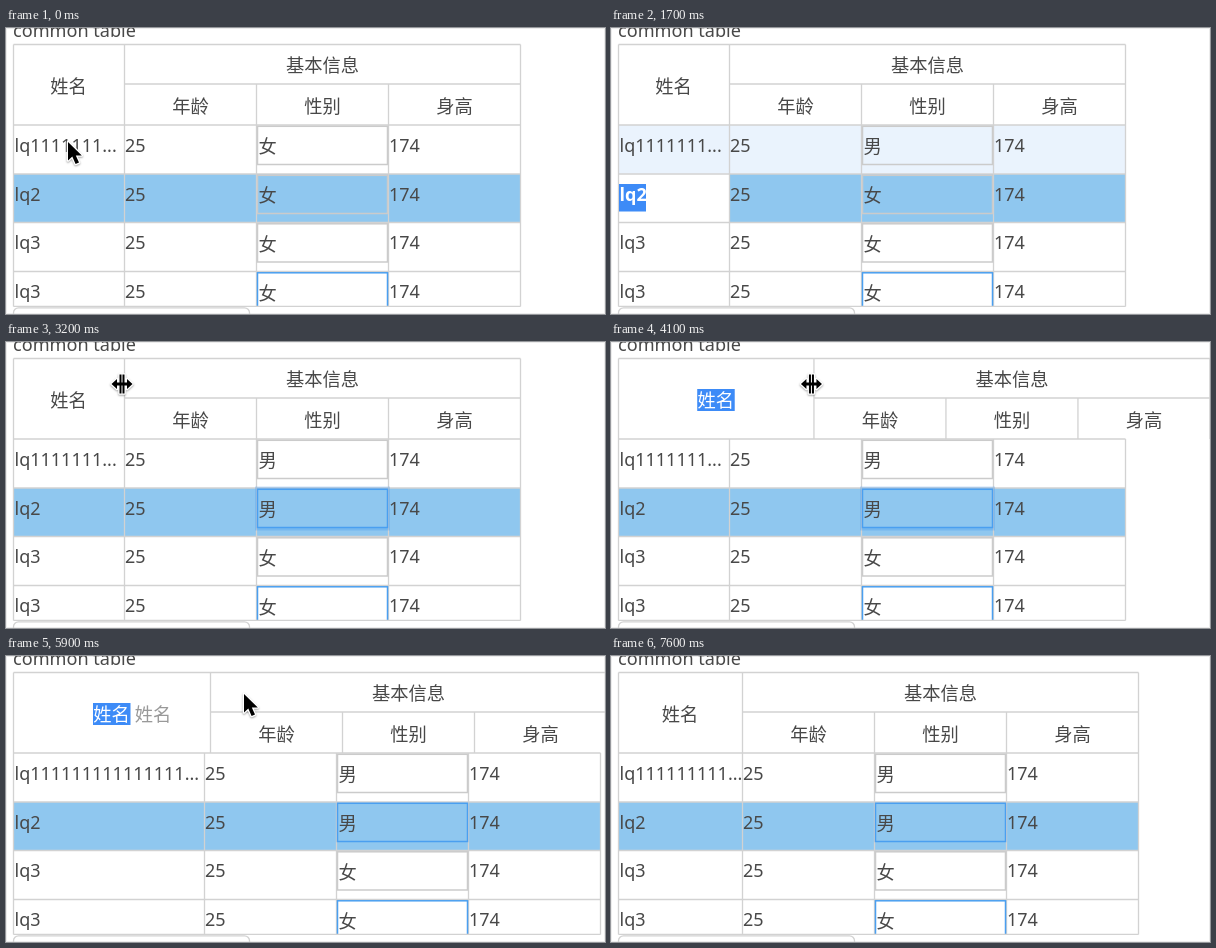
Animation of 599x286 px, one loop 7700 ms. Source, as an HTML page with a canvas:

```html
<!DOCTYPE html>
<html lang="zh-CN">
<head>
<meta charset="utf-8">
<title>common table</title>
<style>
html, body { margin: 0; width: 100%; height: 100%; overflow: hidden; background: #fff; }
canvas { display: block; }
</style>
</head>
<body>
<canvas id="stage" width="599" height="286"></canvas>
<script>
const ctx = document.getElementById('stage').getContext('2d');
const LOOP = 7700, STEP = 100;
const LEFT = 7.5, COL = 132, BOTTOM = 278.5;
const ROWS = [97, 146, 194.5, 243.5];
const INK = '#484848', LINE = '#d2d2d2', BLUE = '#4a9ff0', ROW = '#8fc7ef', HOVER = '#eaf3fd', MARK = '#3d8bf7';
const FACE = '"Noto Sans", "Noto Sans CJK SC", "Noto Sans CJK", sans-serif';

const arrow = new Path2D('M0 0V18.5L4.3 14.6L7.6 22L11 20.5L7.8 13.4H13.8Z');
const resize = new Path2D('M-2.5-9.5H-.5V-1.5H.5V-9.5H2.5V-1.5H5V-5L10.5 0L5 5V1.5H2.5V9.5H.5V1.5H-.5V9.5H-2.5V1.5H-5V5L-10.5 0L-5-5V-1.5H-2.5Z');

// Smooth interpolation through [time, value] points
function track(t, keys) {
  const i = keys.findIndex(k => k[0] > t);
  if (i < 0) return keys[keys.length - 1][1];
  if (i === 0) return keys[0][1];
  const [t0, a] = keys[i - 1], [t1, b] = keys[i];
  const p = (t - t0) / (t1 - t0);
  return a + (b - a) * p * p * (3 - 2 * p);
}
const within = (t, from, to) => t >= from && t < to;

function text(str, x, y, color = INK, align = 'left', size = 18, weight = 400) {
  ctx.font = `${weight} ${size}px ${FACE}`;
  ctx.textAlign = align;
  ctx.fillStyle = color;
  ctx.fillText(str, x, y);
}
function fill(x, y, w, h, color) {
  ctx.fillStyle = color;
  ctx.fillRect(x, y, w, h);
}
function line(x1, y1, x2, y2) {
  ctx.strokeStyle = LINE;
  ctx.lineWidth = 1.3;
  ctx.beginPath();
  ctx.moveTo(x1, y1);
  ctx.lineTo(x2, y2);
  ctx.stroke();
}
function box(x, y, w, h, color, width = 1.5) {
  ctx.strokeStyle = color;
  ctx.lineWidth = width;
  ctx.strokeRect(x, y, w, h);
}

function header(t, width) {
  const x = LEFT + width, right = x + 3 * COL, mid = LEFT + width / 2;
  line(LEFT, 16.5, right, 16.5);
  line(x, 56, right, 56);
  for (const gx of [LEFT, x, right]) line(gx, 16.5, gx, 97);
  for (const i of [1, 2]) line(x + i * COL, 56, x + i * COL, 97);
  const marked = within(t, 3600, 6500);
  if (marked) fill(mid - 19, 47, 37.5, 22, MARK);
  text('姓名', mid - .5, 64.5, marked ? '#fff' : INK, 'center', 18.3);
  text('基本信息', x + 1.5 * COL, 43.5, INK, 'center', 18.3);
  ['年龄', '性别', '身高'].forEach((s, i) => text(s, x + (i + .5) * COL, 84.5, INK, 'center', 18.3));
}

function body(t, width) {
  const x = LEFT + width, right = x + 3 * COL;
  const paint = [
    within(t, 400, 1600) ? ROW : within(t, 1600, 1900) ? HOVER : null,
    t < 400 || t >= 1600 ? ROW : null
  ];
  const focus = [within(t, 400, 1600), t >= 2100, false, true];
  const value = [t >= 1100 ? '男' : '女', t >= 2600 ? '男' : '女', '女', '女'];
  const ones = '1'.repeat(Math.floor((width - 30) / 10.3));
  const names = ['lq' + ones + '...', 'lq2', 'lq3', 'lq3'];
  const marked = within(t, 1600, 1800);

  ctx.save();
  ctx.beginPath();
  ctx.rect(0, 90, 599, 189);
  ctx.clip();
  ROWS.forEach((y, i) => {
    if (paint[i]) fill(LEFT, y, right - LEFT, 48.5, paint[i]);
    if (i === 1 && marked) fill(LEFT, y, width, 48.5, '#fff');
  });
  ROWS.forEach(y => line(LEFT, y, right, y));
  for (const gx of [LEFT, x, x + COL, x + 2 * COL, right]) line(gx, 97, gx, BOTTOM);
  ROWS.forEach((y, i) => {
    const base = y + 26.7, sx = x + COL;
    if (i === 1 && within(t, 2100, 4200)) box(sx, y, 132, 41, 'rgba(45,140,240,.25)', 3);
    box(sx + 1, y + 1.3, 130, 38.2, focus[i] ? BLUE : '#cbcbcb');
    const selected = i === 1 && marked;
    if (selected) fill(8, 156, 27, 27.5, MARK);
    text(names[i], 8.5, base, selected ? '#fff' : INK, 'left', 18, selected ? 600 : 400);
    text('25', x + .5, base);
    text(value[i], sx + 2, base + 1.6, INK, 'left', 18.3);
    text('174', x + 2 * COL + .5, base);
  });
  line(LEFT, BOTTOM, right, BOTTOM);
  ctx.restore();
}

function dropdown(x, y, active) {
  fill(x, y, 134, 86, '#fff');
  fill(x, y + (active ? 43 : 1), 134, 42, '#e3f5fe');
  box(x, y, 134, 86, '#bed8f7', 2);
  text('女', x + 17.5, y + 26.5, '#777', 'left', 15.5);
  text('男', x + 17.5, y + 68.5, '#777', 'left', 15.5);
}

function pointer(shape, x, y) {
  ctx.save();
  ctx.translate(x, y);
  ctx.lineJoin = 'round';
  ctx.lineWidth = 2.6;
  ctx.strokeStyle = '#fff';
  ctx.shadowColor = 'rgba(0,0,0,.35)';
  ctx.shadowBlur = 2;
  ctx.shadowOffsetY = 1;
  ctx.stroke(shape);
  ctx.shadowColor = 'transparent';
  ctx.fillStyle = '#000';
  ctx.fill(shape);
  ctx.restore();
}

function draw(t) {
  const head = track(t, [[3300, 111], [4000, 197], [4300, 191], [5600, 191], [5800, 197], [6500, 197], [7100, 124]]);
  const width = t < 4300 ? 111 : t < 7100 ? 191 : 124;

  fill(0, 0, 599, 286, '#fff');
  box(.5, .5, 598, 285, '#ececec', 1);
  text('common table', 7, 9, INK, 'left', 18.1);
  header(t, head);
  body(t, width);

  // Field below the table
  ctx.strokeStyle = LINE;
  ctx.lineWidth = 1.3;
  ctx.beginPath();
  ctx.roundRect(7.5, 279.8, 236, 20, 5);
  ctx.stroke();

  if (within(t, 500, 1100)) dropdown(249.5, 137, t >= 800);
  if (within(t, 2200, 2600)) dropdown(249.5, 186, t >= 2400);

  const x = track(t, [[0, 62], [400, 250], [1100, 248], [1500, 40], [2700, 250], [3200, 116],
    [5500, 199], [5900, 238], [6400, 203]]);
  const y = track(t, [[0, 114], [400, 120], [1100, 125], [1500, 150], [2700, 200], [3200, 42],
    [4300, 42], [4700, 33], [5400, 33], [5900, 38], [6400, 42]]);
  if (within(t, 5600, 6300)) text('姓名', x - 91, y + 26.5, '#999', 'center', 18.3);
  if (within(t, 3100, 4400) || within(t, 6400, 7400)) {
    pointer(resize, t < 3200 ? x : LEFT + head - 2.5, t < 3200 ? y : 42);
  } else if (t < 400 || within(t, 1200, 1500) || within(t, 2700, 6400)) {
    pointer(arrow, t >= 4400 && t < 5500 ? 199 : x, y);
  }
}

const start = performance.now();
function frame() {
  const t = (performance.now() - start) % LOOP;
  draw(Math.floor(t / STEP) * STEP);
  requestAnimationFrame(frame);
}
frame();
</script>
</body>
</html>
```
